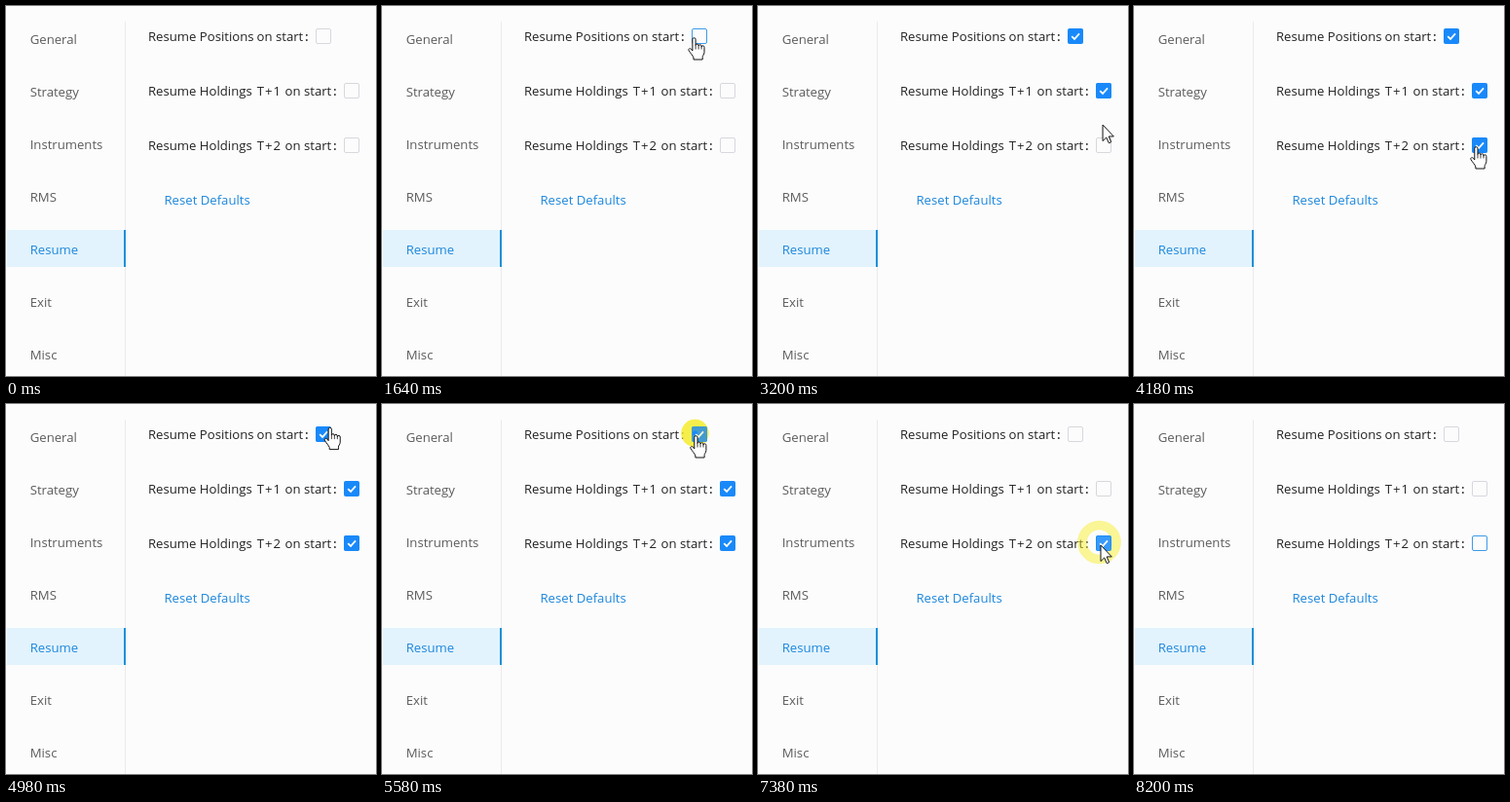
An HTML page for the animation above (8700 ms loop, 380x380 px).

```html
<!DOCTYPE html>
<html lang="en">
<head>
<meta charset="utf-8">
<title>Resume settings</title>
<style>
  html, body { margin: 0; width: 100%; height: 100%; overflow: hidden; background: #fcfcfc; }
  svg { display: block; width: 100vw; height: 100vh; }
  text { font: 13.15px "Open Sans", "Noto Sans", sans-serif; fill: #222; }
  .nav text { fill: #5c5c5c; }
  .nav .on, .link { fill: #1d87dc; }
  .day { letter-spacing: .9px; }
  .colon { font-weight: 600; }
</style>
</head>
<body>
<svg viewBox="0 0 380 380">
  <rect width="380" height="380" fill="#fcfcfc"/>
  <path d="M122.5 16V380" stroke="#ebebeb"/>
  <rect x="1" y="230" width="122" height="38" fill="#e2f3fd"/>
  <rect x="121" y="230" width="2" height="38" fill="#2090d8"/>
  <g class="nav" id="nav"></g>
  <g id="labels"></g>
  <text class="link" x="162.5" y="204">Reset Defaults</text>
  <circle id="under" fill="none" stroke="#f5ec22"/>
  <g id="boxes"></g>
  <circle id="over" fill="none" stroke="#f5ec22"/>
  <g id="cursor" fill="#fff" stroke="#111" stroke-linejoin="round">
    <path id="arrow" d="M.5 .5V17L4.2 13.4L6.8 19.2L9.2 18.1L6.7 12.4H11.8Z"/>
    <g id="hand">
      <path d="M-1.7 13.5V1.8a1.6 1.6 0 0 1 3.2 0V8a1.5 1.5 0 0 1 3 .2V8.6a1.5 1.5 0 0 1 3 .3V9.6a1.4 1.4 0 0 1 2.9 .3V15C10.4 17.5 8.6 18.3 8.6 20V22.5H-.6V20.5C-1.4 18.4 -4 15.8 -5.6 13C-6.2 11.4 -4.2 10.4 -3 11.8Z"/>
      <path fill="none" stroke-width=".8" d="M1.5 8V12M4.5 8.6V12M7.5 9.4V12"/>
    </g>
  </g>
</svg>
<script>
const LOOP = 8700, ENTER = 960, IDLE = 7000, EXIT = 7520, GONE = 7930;
const HOLD = 80, SPREAD = 300, TOGGLE = 180, FADE = 150, FOCUS = 100;

const $ = id => document.getElementById(id);
const seg = (t, from, to) => Math.max(0, Math.min(1, (t - from) / (to - from)));
const smooth = k => k * k * (3 - 2 * k);
const mix = (p, q, k) => ({ x: p.x + (q.x - p.x) * k, y: p.y + (q.y - p.y) * k });
const shift = (p, x, y) => ({ x: p.x + x, y: p.y + y });

function set(el, attrs) {
  for (const name in attrs) el.setAttribute(name, attrs[name]);
}
function add(parent, tag, attrs, text) {
  const el = document.createElementNS("http://www.w3.org/2000/svg", tag);
  set(el, attrs);
  if (text) el.textContent = text;
  parent.appendChild(el);
  return el;
}

["General", "Strategy", "Instruments", "RMS", "Resume", "Exit", "Misc"].forEach((name, i) =>
  add($("nav"), "text", { x: 24.7, y: 39 + 54 * i, class: name === "Resume" ? "on" : "" }, name));

const boxes = ["", "T+1", "T+2"].map((day, i) => {
  const x = day ? 347 : 318, y = 23 + 56 * i;
  const word = (left, text, style = "") => add($("labels"), "text", { x: left, y: y + 13, class: style }, text);
  word(146, "Resume");
  word(198.8, day ? "Holdings" : "Positions");
  word(257.8, day, "day");
  word(x - 60.4, "on start");
  word(x - 11, ":", "colon");

  const g = add($("boxes"), "g", { transform: `translate(${x} ${y})` });
  const frame = add(g, "rect", { x: .5, y: .5, width: 15, height: 15, rx: 1.5, fill: "none" });
  const fill = add(g, "g", {});
  add(fill, "rect", { width: 16, height: 16, rx: 2, fill: "#1989fa" });
  add(fill, "path", { d: "M4.2 8.2L7 11L12 5.3", fill: "none", stroke: "#fff", "stroke-width": 1.8 });
  return { x, y, frame, fill };
});

// Two rounds over the boxes: leave, arrive, press, then where in the box the pointer lands.
const visits = [
  [ENTER, 1600, 1900, 2.5, 9.5],
  [2270, 2650, 2730, 7, 9],
  [2900, 3440, 3800, 8, 10],
  [4510, 4940, 5480, 15, 1],
  [5850, 6240, 6270, 6, 10],
  [6430, 6690, 7180, 4, 9]
].map(([leave, arrive, press, dx, dy], i) => {
  const box = boxes[i % 3];
  return { leave, arrive, press, box, land: shift(box, dx, dy), aim: shift(box, 4.5, 9.5) };
});

function pointer(t) {
  if (t < ENTER || t > GONE) return null;
  let p = { x: 298, y: 358 };
  for (const v of visits) {
    p = mix(p, v.land, smooth(seg(t, v.leave, v.arrive)));
    p = mix(p, v.aim, smooth(seg(t, v.arrive, v.press)));
  }
  return mix(p, { x: 344, y: 384 }, smooth(seg(t, EXIT, GONE)));
}

function drawRing(t) {
  const v = visits.filter(v => t >= v.press).pop();
  const k = v ? seg(t - v.press, HOLD, HOLD + SPREAD) : 1;
  const centre = v ? shift(v.box, 3.5, 7) : { x: 0, y: 0 };
  const outer = 12 + 16 * (1 - (1 - k) ** 2), width = 12 - 6 * k;
  const alpha = .85 * (1 - k) ** 1.4;
  for (const [id, share] of [["under", 1], ["over", .25]]) {
    set($(id), {
      cx: centre.x, cy: centre.y, r: outer - width / 2,
      "stroke-width": width, opacity: alpha * share
    });
  }
}

function draw(t) {
  const p = pointer(t);
  const over = b => p && t < IDLE && p.x >= b.x && p.x <= b.x + 16 && p.y >= b.y && p.y <= b.y + 16;
  const focus = visits.filter(v => t > v.press + FOCUS).pop();
  const flip = v => seg(t - v.press, TOGGLE, TOGGLE + FADE);

  boxes.forEach((b, i) => {
    b.fill.setAttribute("opacity", flip(visits[i]) - flip(visits[i + 3]));
    const lit = over(b) || focus && focus.box === b;
    b.frame.setAttribute("stroke", lit ? "#3d9be9" : "#d7d7de");
  });

  drawRing(t);
  $("cursor").style.display = p ? "" : "none";
  if (!p) return;
  const hand = boxes.some(over);
  $("cursor").setAttribute("transform", `translate(${p.x} ${p.y})`);
  $("hand").style.display = hand ? "" : "none";
  $("arrow").style.display = hand ? "none" : "";
}

const start = performance.now();
function tick(now) {
  draw(Math.max(0, now - start) % LOOP);
  requestAnimationFrame(tick);
}
draw(0);
requestAnimationFrame(tick);
</script>
</body>
</html>
```
